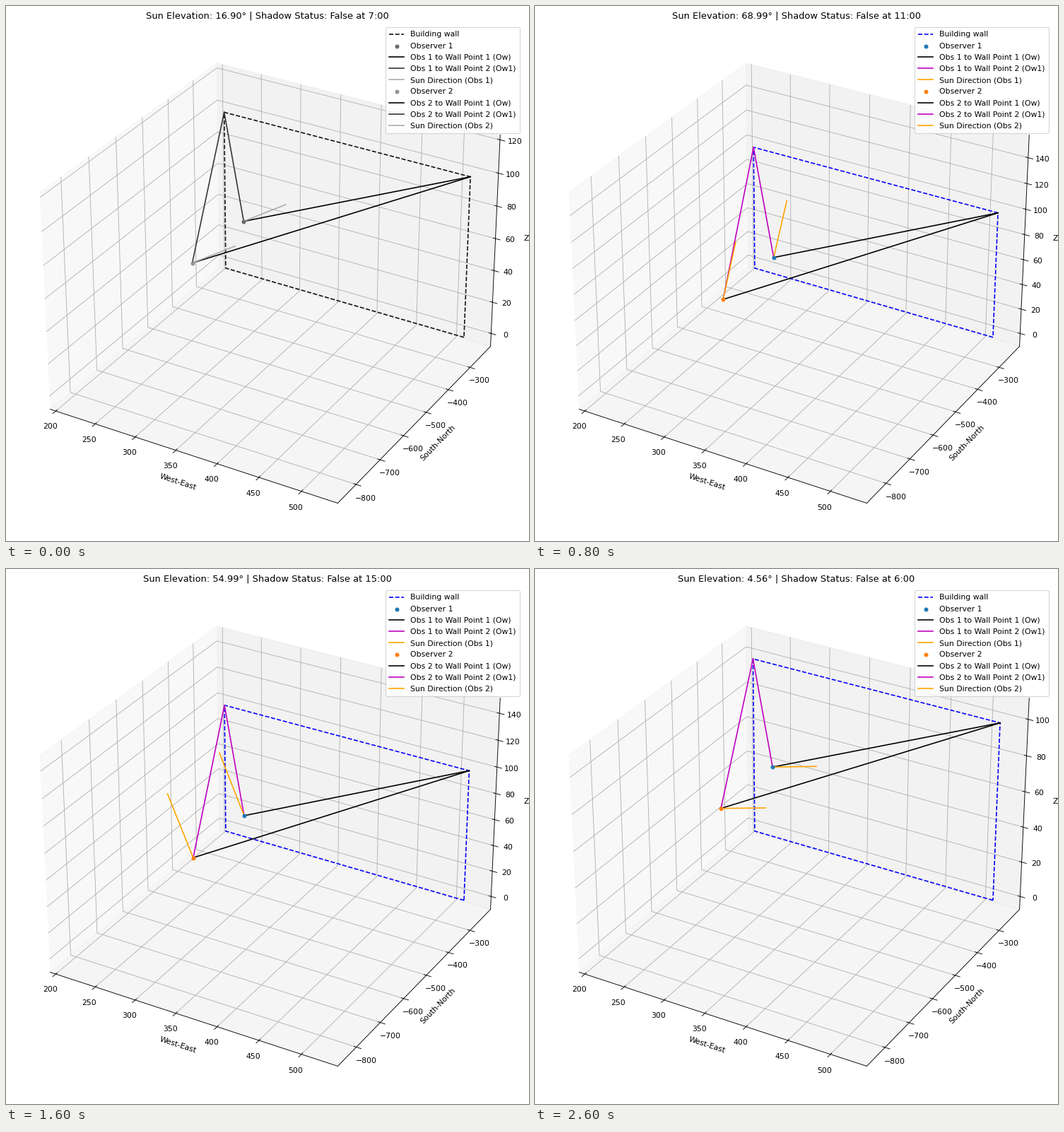
These frames come from a looping animation (740x757 px, 2800 ms). A matplotlib script:

```python
import numpy as np
import matplotlib.pyplot as plt
from matplotlib.animation import FuncAnimation
from matplotlib.colors import to_rgb

W, H, DPI = 740, 757, 80
SCALE = 0.98
plt.rcParams.update({
    "font.size": 10 * SCALE,
    "lines.linewidth": 1.5 * SCALE,
    "grid.linewidth": 0.8 * SCALE,
})

HOURS = list(range(7, 20)) + [6]
ELEVATION = [16.90, 29.72, 42.79, 55.96, 68.99, 80.65, 79.96,
             68.05, 54.99, 41.82, 28.75, 15.95, 3.67, 4.56]
GRAY_FRAMES = 3

LATITUDE, DECLINATION = np.radians([28.49, 21.55])
SOLAR_NOON = 12.462
RAY = 50

WALL_X = (215.1, 519.9)
WALL_Y = -245.3
HEIGHT = 100
OBSERVERS = [(361.0, -638.6, HEIGHT), (360.2, -831.4, HEIGHT)]

fig = plt.figure(figsize=(W / DPI, H / DPI), dpi=DPI, facecolor="white")
side, margin = 724.33, 7.84
ax = fig.add_axes([margin / W, margin / H, side / W, side / H], projection="3d")
title = fig.text(0.5, 1 - 18 / H, "", fontsize=12 * SCALE,
                 ha="center", va="baseline")


def sun_vector(hour, elevation):
    """East, north and up parts of the ray towards the sun."""
    angle = np.radians(15 * (hour - SOLAR_NOON))
    up = np.sin(np.radians(elevation))
    east = -np.cos(DECLINATION) * np.sin(angle)
    north = (np.sin(DECLINATION) - np.sin(LATITUDE) * up) / np.cos(LATITUDE)
    return RAY * np.array([east, north, up])


def tone(color, gray):
    if not gray:
        return color
    return (float(np.dot(to_rgb(color), (0.2126, 0.7152, 0.0722))),) * 3


def set_axis(name, low, high, step):
    """Ticks fill the data range plus 5%; the pane reaches a little further."""
    pad = 0.05 * (high - low)
    low, high = low - pad, high + pad
    ticks = np.arange(np.ceil(low / step), np.floor(high / step) + 1) * step
    edge = (high - low) / 48
    ax.set(**{f"{name}ticks": ticks})
    ax.set(**{f"{name}lim": (low - edge, high + edge)})


def segment(a, b, color, label):
    ax.plot(*zip(a, b), color=color, label=label)


def draw(i):
    hour, elevation = HOURS[i], ELEVATION[i]
    gray = i < GRAY_FRAMES
    sun = sun_vector(hour, elevation)
    left, right = WALL_X

    ax.cla()
    ax.plot([right, left, left, right, right], [WALL_Y] * 5,
            [0, 0, HEIGHT, HEIGHT, 0], "--", color=tone("blue", gray),
            label="Building wall")
    for n, (obs, dot) in enumerate(zip(OBSERVERS, ("tab:blue", "tab:orange")), 1):
        ax.scatter(*[[v] for v in obs], color=[tone(dot, gray)],
                   s=20 * SCALE ** 2, depthshade=False, label=f"Observer {n}")
        segment(obs, (right, WALL_Y, HEIGHT), "black",
                f"Obs {n} to Wall Point 1 (Ow)")
        segment(obs, (left, WALL_Y, HEIGHT), tone("m", gray),
                f"Obs {n} to Wall Point 2 (Ow1)")
        segment(obs, np.add(obs, sun), tone("orange", gray),
                f"Sun Direction (Obs {n})")

    set_axis("x", left, right, 50)
    set_axis("y", OBSERVERS[1][1] + min(0, sun[1]), WALL_Y, 100)
    set_axis("z", 0, HEIGHT + sun[2], 20)
    ax.tick_params(pad=3.3)
    ax.set_xlabel("West-East", labelpad=3.5)
    ax.set_ylabel("South-North", labelpad=3.5)
    ax.set_zlabel("Z", labelpad=3.5)
    ax.view_init(elev=30, azim=-60)
    ax.legend(loc="upper right", labelspacing=0.566, borderpad=0.47)
    title.set_text(f"Sun Elevation: {elevation:.2f}° | "
                   f"Shadow Status: False at {hour}:00")
    return []


anim = FuncAnimation(fig, draw, frames=len(HOURS), interval=200,
                     repeat=True, repeat_delay=0, blit=False)
plt.show()
```
